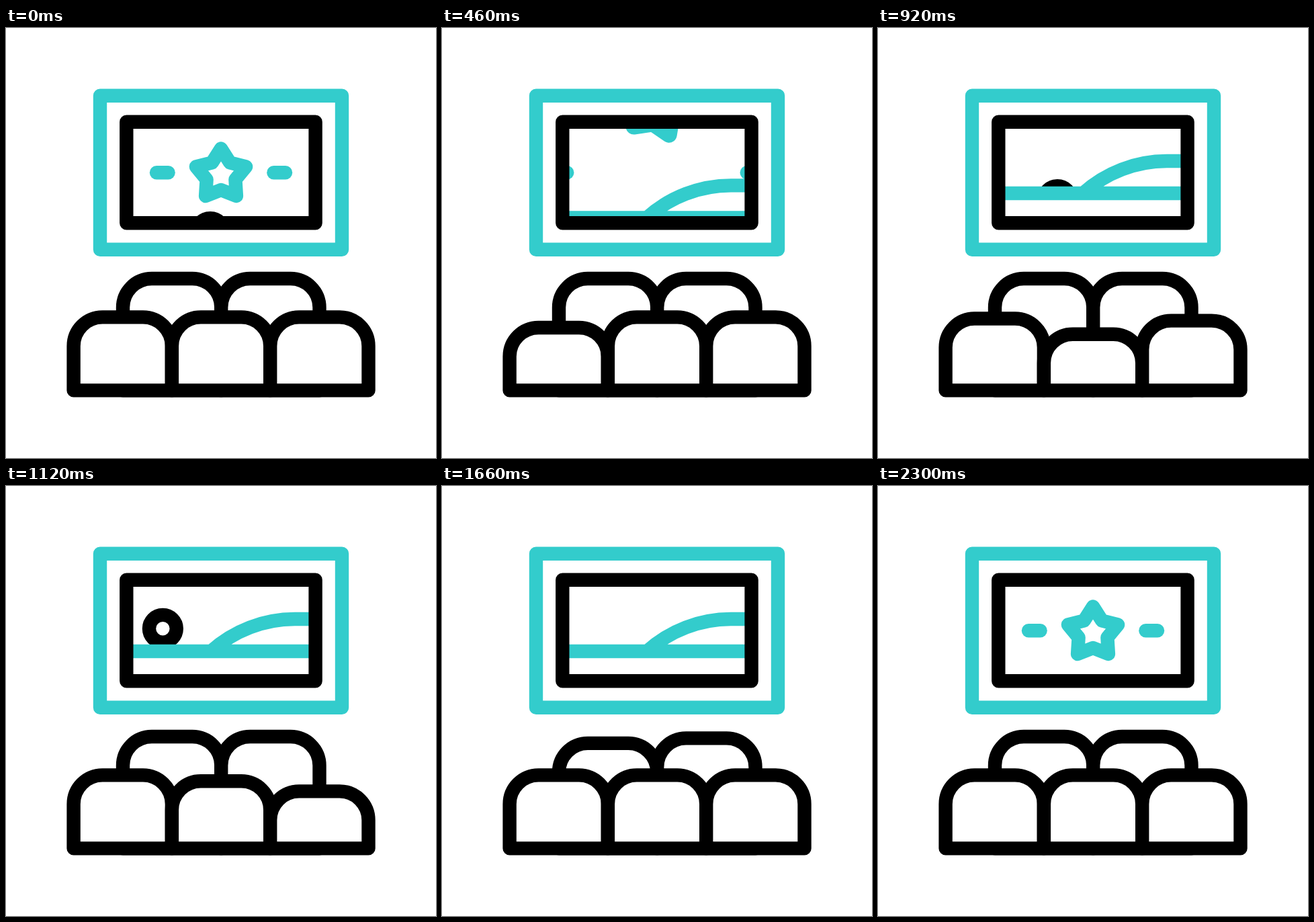
These frames come from a looping animation (640 by 640 pixels, 2400 ms). An HTML page:

```html
<!DOCTYPE html>
<html lang="en">
<head>
<meta charset="utf-8">
<title>Cinema</title>
<style>
  html, body { margin: 0; width: 100%; height: 100%; overflow: hidden; background: #fff; }
  svg { display: block; width: 100%; height: 100%; }
  .line { fill: none; stroke: #000; stroke-width: 20.4; stroke-linejoin: round; }
  .teal { stroke: #33cccc; }
  .seat { fill: #fff; }
</style>
</head>
<body>
<svg viewBox="0 0 640 640">
  <clipPath id="screen"><rect x="185" y="145" width="270" height="140"/></clipPath>
  <rect class="line teal" x="140" y="100.7" width="360" height="229"/>
  <g clip-path="url(#screen)">
    <circle id="sun" class="line" r="20.4"/>
    <g id="scene">
      <rect x="180" y="246" width="280" height="150" fill="#fff"/>
      <path class="line teal" d="M180 246H460M305 246A187.3 187.3 0 0 1 430 198H460"/>
    </g>
    <g class="line teal" stroke-linecap="round">
      <path id="dashL" d="M224 215.2h17.6"/>
      <path id="dashR" d="M398.4 215.2h17.6"/>
    </g>
    <path id="star" class="line teal"/>
  </g>
  <rect class="line" x="179.3" y="139.8" width="281.3" height="150.5"/>
  <g id="seats"></g>
</svg>
<script>
const LOOP = 2400;
const byId = id => document.getElementById(id);
const clamp = x => Math.min(1, Math.max(0, x));
const progress = (t, from, to) => clamp((t - from) / (to - from));
const ease = x => Math.sin(x * Math.PI / 2) ** 2;
const move = (id, x, y, rest = '') =>
  byId(id).setAttribute('transform', `translate(${x} ${y}) ${rest}`);

// Back row first, so the front row covers it
const seats = [
  { x: 174, top: 373, dip: 10, start: 1260 },
  { x: 320.2, top: 373, dip: 10, start: 1540 },
  { x: 100.6, top: 430.4, dip: 25.5, start: 250 },
  { x: 246.9, top: 430.4, dip: 25.5, start: 530 },
  { x: 393.2, top: 430.4, dip: 25.5, start: 810 },
];
const DIP_TIME = 740;

for (const seat of seats) {
  seat.path = document.createElementNS('http://www.w3.org/2000/svg', 'path');
  seat.path.setAttribute('class', 'line seat');
  byId('seats').append(seat.path);
}

const seatPath = (x, y) =>
  `M${x} 539.4V${y + 43}a43 43 0 0 1 43 -43h60.3a43 43 0 0 1 43 43V539.4z`;

const starPoints = Array.from({ length: 10 }, (_, i) => {
  const r = i % 2 ? 22.5 : 39, a = i * Math.PI / 5;
  return `${r * Math.sin(a)} ${-r * Math.cos(a)}`;
});
byId('star').setAttribute('d', `M${starPoints.join('L')}z`);

function draw(t) {
  const away = ease(progress(t, 120, 700)) - ease(progress(t, 1640, 2300));
  const raised = ease(progress(t, 120, 700)) - ease(progress(t, 1660, 2320));
  move('dashL', -87 * away, 0);
  move('dashR', 87 * away, 0);
  move('star', 320, 218.5 - 160 * away, `rotate(${360 * away}) scale(${1 + 0.27 * away})`);
  move('scene', 0, 100 * (1 - raised));

  const sun = progress(t, 700, 1600);
  move('sun', 304 - 151 * sun, 303.5 - 195 * sun);

  for (const { path, x, top, dip, start } of seats) {
    const drop = dip * Math.sin(Math.PI * progress(t, start, start + DIP_TIME)) ** 2;
    path.setAttribute('d', seatPath(x, top + drop));
  }
}

function tick() {
  draw(performance.now() % LOOP);
  requestAnimationFrame(tick);
}
tick();
</script>
</body>
</html>
```
